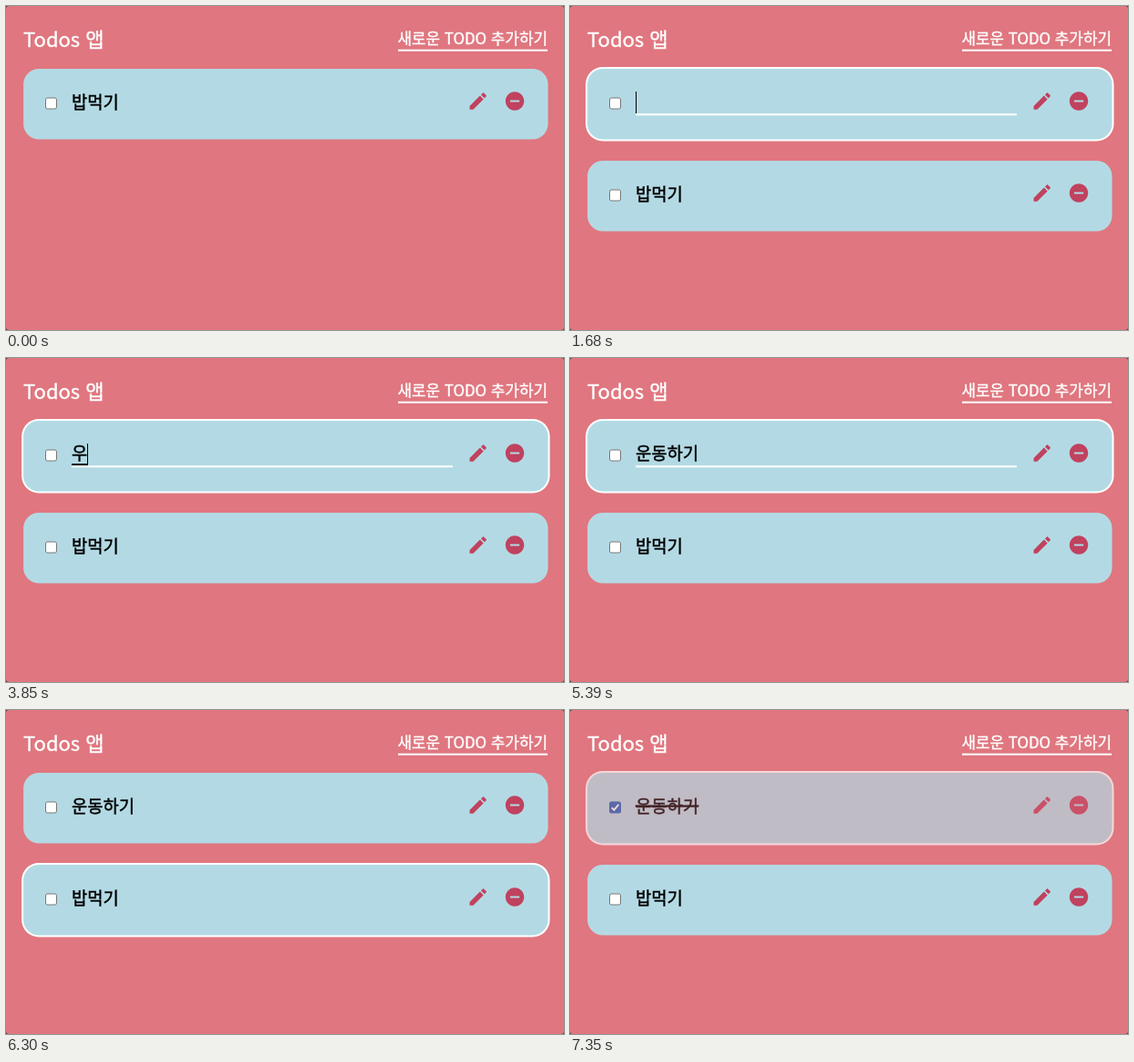
An HTML page for the animation above (8 s loop, 612 by 356 pixels).

```html
<!DOCTYPE html>
<html lang="ko">
<head>
<meta charset="utf-8">
<style>
  html, body { margin: 0; height: 100%; overflow: hidden; background: #4b4148; }
  svg { display: block; width: 612px; height: 356px; font-family: "Noto Sans CJK KR", "Noto Sans CJK", sans-serif; }
  /* a hairline stroke gives the slightly heavier text weight */
  text { stroke: #000; stroke-width: .4px; }
  .head { fill: #fff; }
  .head text { stroke: #fff; }
  .row.done { opacity: .7; }
  .row.done .label { text-decoration: line-through; }
  .card { fill: #b3dae4; }
  .ring { fill: #fff; }
  .icon { fill: #c0425f; }
  .label { font-size: 18.75px; }
</style>
</head>
<body>
<svg viewBox="0 0 612 356">
  <defs>
    <g id="icons" class="icon">
      <path transform="translate(505.5 92.3) scale(1.02)" d="M3 17.25V21h3.75L17.81 9.94l-3.75-3.75L3 17.25zM20.71 7.04c.39-.39.39-1.02 0-1.41l-2.34-2.34c-.39-.39-1.02-.39-1.41 0l-1.83 1.83 3.75 3.75 1.83-1.83z"/>
      <path transform="translate(545.8 92.3) scale(1.02)" d="M12 2C6.48 2 2 6.48 2 12s4.48 10 10 10 10-4.48 10-10S17.52 2 12 2zm5 11H7v-2h10v2z"/>
    </g>
  </defs>
  <rect width="612" height="356" rx="3" fill="#e0767f"/>
  <g class="head">
    <text x="19" y="44.8" font-size="22">Todos 앱</text>
    <text x="594" y="42.4" font-size="16.9" text-anchor="end">새로운 TODO 추가하기</text>
    <rect x="430" y="47.7" width="164" height="2"/>
  </g>
  <g id="rows"></g>
</svg>
<script>
const LOOP = 8000, BLINK = 560, ADD = 1680, COMMIT = 6090, CHECK = 7350;
const CHAR = 17.25, LEFT = 72;
// [time, committed text, syllable being composed]
const keys = [
  [ADD, '', ''], [2870, '', 'ㅇ'], [3850, '', '우'], [3990, '', '운'],
  [4130, '운', 'ㄷ'], [4340, '운', '도'], [4480, '운', '동'],
  [4550, '운동', 'ㅎ'], [4620, '운동', '하'], [4760, '운동하', '기'], [4830, '운동하기', '']
];
// Rows that carry the ring, counted from the top
const rings = [[0, []], [ADD, [0]], [5740, [0, 1]], [5810, [0]], [COMMIT, []], [6300, [1]], [6440, [0]]];
const borders = [[0, '#767676'], [7000, '#4f4f4f'], [7210, '#8d8d8d']];
const at = (list, t) => list.filter(k => k[0] <= t).pop();
const rect = (x, y, w, h, rest = '') => `<rect x="${x}" y="${y}" width="${w}" height="${h}" ${rest}/>`;
const label = (s, y = 113) => `<text class="label" x="${LEFT}" y="${y}">${s}</text>`;

function checkbox(done, border) {
  return done
    ? rect(43, 100.5, 13, 13, 'rx="2.5" fill="#2265bd"') +
      '<path d="M45.8 107.3l2.6 2.6 4.9-6" fill="none" stroke="#fff" stroke-width="1.9"/>'
    : rect(43.5, 101, 12, 12, `rx="2" fill="#fff" stroke="${border}"`);
}

function editor(t) {
  const [start, text, composing] = at(keys, t);
  const end = LEFT + CHAR * (text + composing).length;
  const caretOn = Math.floor((t - start) / BLINK) % 2 === 0;
  return rect(LEFT, 118.2, 418, 2, 'fill="#fff"') +
    label(text + composing, 112) +
    (composing ? rect(end - CHAR, 116, CHAR, 2) : '') +
    (caretOn ? rect(Math.round(end), 94, 1, 24) : '');
}

function row(i, { ring, done, border = '#767676', body }) {
  return `<g class="row ${done ? 'done' : ''}" transform="translate(0 ${i * 101})">` +
    (ring ? rect(17.1, 67, 579.4, 81.5, 'rx="19" class="ring"') : '') +
    rect(19.1, 69, 575.4, 77.5, 'rx="17" class="card"') +
    checkbox(done, border) + body + '<use href="#icons"/></g>';
}

const rows = document.getElementById('rows');
let last = '';

function draw(now) {
  const t = now % LOOP;
  const added = t >= ADD;
  const ringed = at(rings, t)[1];
  let html = row(added ? 1 : 0, { ring: ringed.includes(1), body: label('밥먹기') });
  if (added) html += row(0, {
    ring: ringed.includes(0),
    done: t >= CHECK,
    border: at(borders, t)[1],
    body: t < COMMIT ? editor(t) : label('운동하기')
  });
  if (html !== last) rows.innerHTML = last = html;
  requestAnimationFrame(draw);
}
draw(performance.now());
</script>
</body>
</html>
```
